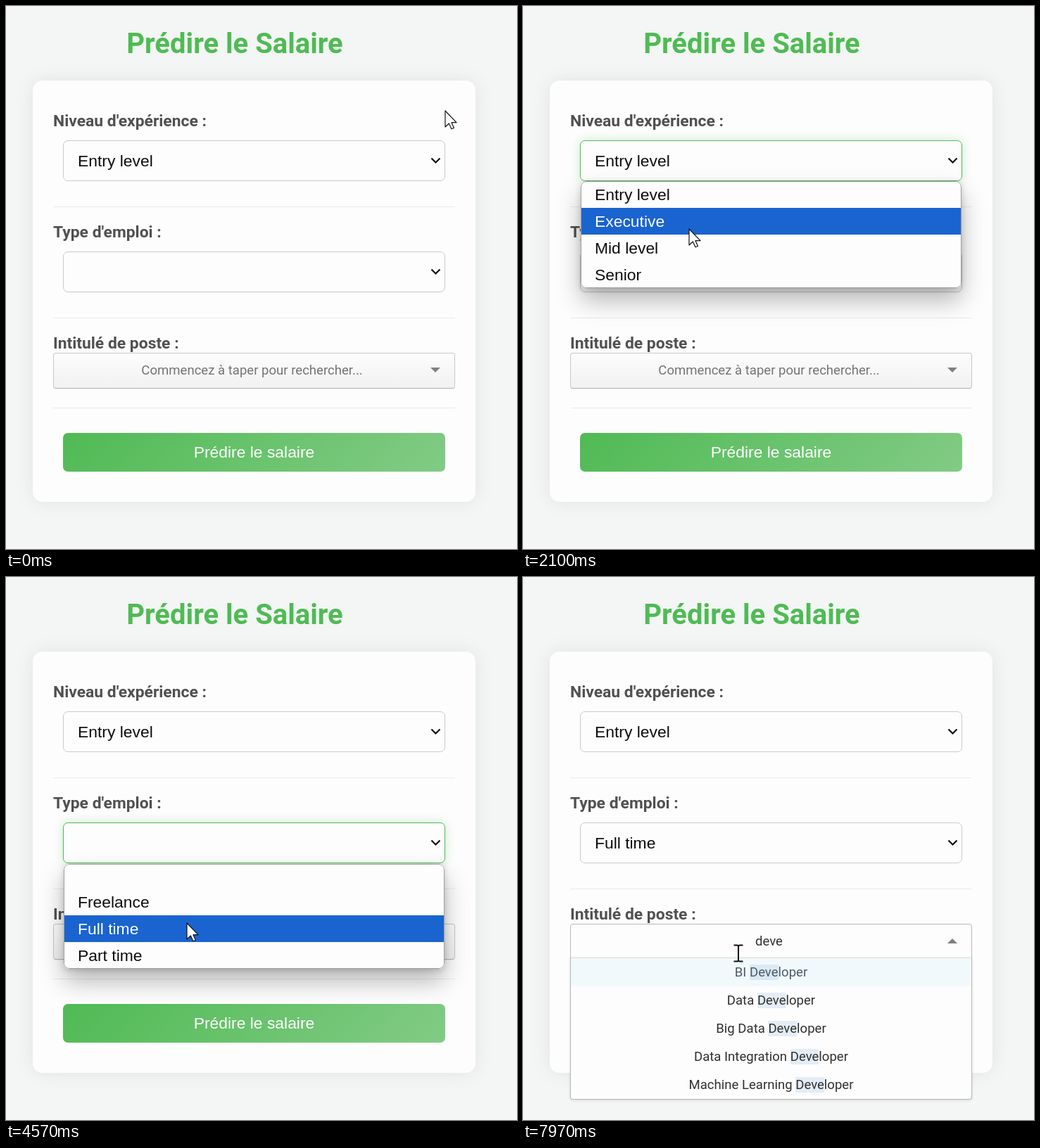
These frames come from a looping animation (726x772 px, 8000 ms). An HTML page:

```html
<!DOCTYPE html>
<html lang="fr">
<head>
<meta charset="utf-8">
<title>Prédire le Salaire</title>
<style>
* { box-sizing: border-box; margin: 0; }
html, body { width: 100%; height: 100%; overflow: hidden; background: #f3f6f4; }
#stage { position: relative; width: 726px; height: 772px; overflow: hidden; font-family: Roboto, sans-serif; }
#stage div, #stage svg, h1, h2, hr { position: absolute; white-space: pre; }
[hidden] { display: none !important; }
h1 { left: 1px; top: 29.5px; width: 648px; text-align: center; font: 700 40px/48px Roboto, sans-serif; color: #4fbb54; }
h2 { left: 67px; font: 700 22.86px/29px Roboto, sans-serif; color: #505050; }
hr { left: 67px; width: 571px; height: 1px; border: 0; background: #eaeaea; }
.card { left: 38px; top: 106px; width: 629px; height: 599px; border-radius: 14px; background: #fdfdfd; box-shadow: 0 0 28px rgba(0, 0, 0, .08); }
.select, .popup, .button { font: 22.86px/38px "Liberation Sans", Arial, sans-serif; color: #0c0c0c; }
.select { left: 81px; width: 543px; height: 58px; padding-left: 20px; line-height: 56px; border: 1px solid #cacace; border-radius: 7px; background: #fdfdfd; }
.select.focus { border-color: #55b85c; box-shadow: 0 0 14px rgba(76, 185, 80, .3); }
.select svg { left: 521px; top: 22px; }
.popup { left: 82px; width: 541px; border-radius: 8px; overflow: hidden; background: #fdfdfd; }
.popup::after { content: ""; position: absolute; inset: 0; border: 1px solid #a0a0a0; border-radius: 8px; }
.shade { left: 82px; width: 541px; border-radius: 8px; box-shadow: 0 18px 34px rgba(0, 0, 0, .28), 0 2px 8px rgba(0, 0, 0, .16); }
#stage .popup div { position: static; height: 38px; padding-left: 20px; }
#stage .popup .on { background: #1a64d0; color: #fdfdfd; }
.button { left: 81px; top: 607px; width: 543px; height: 55px; border-radius: 7px; text-align: center; line-height: 55px; color: #fff; background: linear-gradient(135deg, #50ba54, #82cb85); }
.search, .list { left: 67px; width: 571px; font-size: 18.57px; text-align: center; color: #303030; }
.search { top: 493px; height: 51px; padding-right: 6px; line-height: 48px; border: 1px solid #c8c8c8; border-bottom-color: #b6b6b6; border-radius: 4px; background: linear-gradient(#fdfdfd, #f1f1f1); box-shadow: 0 1px 1px rgba(0, 0, 0, .06); }
.search.open { border-color: #b8b8b8; border-radius: 4px 4px 0 0; background: #fdfdfd; }
.hint { color: #747474; }
.caret { display: inline-block; width: 1.4px; height: 22px; margin: 0 -1.4px 0 0; vertical-align: -5px; background: #303030; }
.arrow { left: 535px; top: 20px; border: 7px solid transparent; border-top-color: #808080; border-bottom: 0; }
.open .arrow { border-top: 0; border-bottom: 7px solid #808080; }
.list { top: 541px; height: 202px; overflow: hidden; line-height: 40px; border: 1px solid #b8b8b8; border-top-color: #dcdcdc; border-radius: 0 0 4px 4px; background: #fdfdfd; box-shadow: 0 1px 4px rgba(0, 0, 0, .12); }
.list.long { height: 260px; padding-right: 23px; }
#stage .list .row { position: static; height: 40px; }
#stage .list .row:first-child { background: #f2f9fc; color: #495c68; }
mark { color: inherit; background: rgba(125, 168, 208, .2); border-radius: 1px; }
.bar { right: 0; top: 0; width: 23px; height: 260px; background: #f1f1f1; }
.bar::before { content: ""; position: absolute; left: 6px; top: 10px; border: 5.5px solid transparent; border-bottom: 6px solid #888; border-top: 0; }
.bar::after { content: ""; position: absolute; left: 2px; top: 24px; width: 19px; height: 24px; background: #c1c1c1; }
#cursor { left: 0; top: 0; overflow: visible; }
</style>
</head>
<body>
<div id="stage">
  <h1>Prédire le Salaire</h1>
  <div class="card"></div>
  <h2 style="top:149px">Niveau d'expérience :</h2>
  <div class="select" id="level" style="top:191px"><span>Entry level</span></div>
  <hr style="top:285px">
  <h2 style="top:307px">Type d'emploi :</h2>
  <div class="select" id="type" style="top:349px"><span></span></div>
  <hr style="top:443px">
  <h2 style="top:465px">Intitulé de poste :</h2>
  <div class="search" id="search"><span></span><div class="arrow"></div></div>
  <hr style="top:571px">
  <div class="button">Prédire le salaire</div>

  <div id="levelMenu"><div class="shade" style="top:249px;height:152px"></div>
    <div class="popup" style="top:249px;height:152px"><div>Entry level</div><div>Executive</div><div>Mid level</div><div>Senior</div></div></div>
  <div id="typeMenu"><div class="shade" style="top:408px;height:149px"></div>
    <div class="popup" style="top:408px;height:149px"><div style="height:35px"></div><div>Freelance</div><div>Full time</div><div>Part time</div></div></div>
  <div class="list" id="list"></div>

  <svg id="cursor" width="1" height="1" fill="#fff" stroke="#101014" stroke-width="1.2" stroke-linejoin="round">
    <path id="arrow" d="M0 0V23L5.3 18L9 25.8L12.4 24.3L9 16.7H16Z"/>
    <g id="hand">
      <path d="M-2.4 17V2.5Q-2.4 0 0 0T2.4 2.5V10Q6 8.4 6.8 11Q10 9.6 10.9 12Q14.5 11.2 14.5 14.5V20Q14.5 23.5 12.2 26V29H-.5V26.5L-8.6 16.6Q-10 14.2 -8 13.2Q-6.2 12.6 -4.4 14.6Z"/>
      <path d="M2.4 10V15M6.8 11V15.5M10.9 12V16" fill="none"/>
    </g>
    <path id="beam" d="M-6.5 -11.5H-2Q0 -11.5 0 -9.5Q0 -11.5 2 -11.5H6.5M0 -9.5V9.5M-6.5 11.5H-2Q0 11.5 0 9.5Q0 11.5 2 11.5H6.5" fill="none" stroke-width="2"/>
  </svg>
</div>
<script>
const $ = id => document.getElementById(id);
const LOOP = 8000;
const OPEN_LEVEL = 720, CLOSE_LEVEL = 2600;
const OPEN_TYPE = 3400, CLOSE_TYPE = 4720, OPEN_SEARCH = 5640;

// time, x, y of the pointer
const path = [
  [0, 624, 149], [120, 624, 149], [600, 300, 214], [820, 290, 216], [1380, 244, 364],
  [1430, 244, 366], [1640, 244, 366], [2100, 236, 317], [2420, 238, 262], [2650, 238, 262],
  [3200, 252, 382], [3730, 253, 384], [4350, 256, 492], [4780, 257, 492],
  [5100, 262, 478], [5330, 265, 490], [5540, 266, 512], [5800, 266, 513],
  [6300, 243, 511], [6900, 243, 511], [7600, 306, 535], [8000, 306, 535]
];
const typing = [[6640, "d"], [6900, "de"], [7120, "dev"], [7330, "deve"]];
const allJobs = ["Admin & Data Analyst", "AI Engineer", "AI Manager", "Analytics Engineer",
  "Applied Data Scientist", "Applied Machine Learning Engineer"];
const dataJobs = ["BI Developer", "Data Analyst", "Data Modeler", "Data Engineer", "Data Developer", "Data Scientist"];
const devJobs = ["BI Developer", "Data Developer", "Big Data Developer",
  "Data Integration Developer", "Machine Learning Developer"];

document.querySelectorAll(".select").forEach(box => box.insertAdjacentHTML("beforeend",
  '<svg width="16" height="12"><path d="M1.5 2.5L7.5 8.5L13.5 2.5" fill="none" stroke="#0c0c0c" stroke-width="2.2"/></svg>'));

const between = (t, a, b) => t >= a && t < b;
const escapeHtml = s => s.replace(/&/g, "&amp;");

function pointerAt(t) {
  const i = path.findIndex((p, k) => k && t <= p[0]);
  const [t0, x0, y0] = path[i - 1], [t1, x1, y1] = path[i];
  const u = (t - t0) / (t1 - t0), e = u * u * (3 - 2 * u);
  return [x0 + (x1 - x0) * e, y0 + (y1 - y0) * e];
}

function setHtml(el, html) {
  if (el.shown !== html) el.innerHTML = el.shown = html;
}

function showMenu(id, open, row) {
  $(id).hidden = !open;
  $(id).querySelectorAll(".popup div").forEach((el, i) => el.classList.toggle("on", i === row));
}

function showSearch(t) {
  const open = t >= OPEN_SEARCH;
  const [keyTime, query] = typing.filter(k => t >= k[0]).pop() || [OPEN_SEARCH, ""];
  const caret = open && (t - keyTime) % 1060 < 530 ? '<i class="caret"></i>' : "";
  const hint = '<span class="hint">Commencez à taper pour rechercher...</span>';
  $("search").classList.toggle("open", open);
  setHtml($("search").firstChild, query ? query + caret : hint);

  const filter = t < 6690 ? "" : query;
  const jobs = !filter ? allJobs : filter.length < 3 ? dataJobs : devJobs;
  const long = jobs !== devJobs;
  const row = job => `<div class="row">${filter
    ? job.replace(new RegExp(filter, "gi"), "<mark>$&</mark>") : escapeHtml(job)}</div>`;
  $("list").hidden = !open;
  $("list").classList.toggle("long", long);
  setHtml($("list"), jobs.map(row).join("") + (long ? '<div class="bar"></div>' : ""));
}

function render(t) {
  const [x, y] = pointerAt(t);
  const levelOpen = between(t, OPEN_LEVEL, CLOSE_LEVEL);
  const typeOpen = between(t, OPEN_TYPE, CLOSE_TYPE);

  $("level").classList.toggle("focus", between(t, OPEN_LEVEL, OPEN_TYPE));
  $("type").classList.toggle("focus", between(t, OPEN_TYPE, OPEN_SEARCH));
  $("type").firstChild.textContent = t < CLOSE_TYPE ? "" : "Full time";
  showMenu("levelMenu", levelOpen, Math.max(0, Math.floor((y - 249) / 38)));
  showMenu("typeMenu", typeOpen, Math.max(0, Math.floor((y - 405) / 38)));
  showSearch(t);

  const kind = t >= OPEN_SEARCH ? "beam" : t >= 5250 ? "hand" : "arrow";
  for (const id of ["arrow", "hand", "beam"]) $(id).style.display = id === kind ? "" : "none";
  $("cursor").style.transform = `translate(${Math.round(x)}px, ${Math.round(y)}px)`;
}

const start = performance.now();
function tick() {
  render((performance.now() - start) % LOOP);
  requestAnimationFrame(tick);
}
tick();
</script>
</body>
</html>
```
